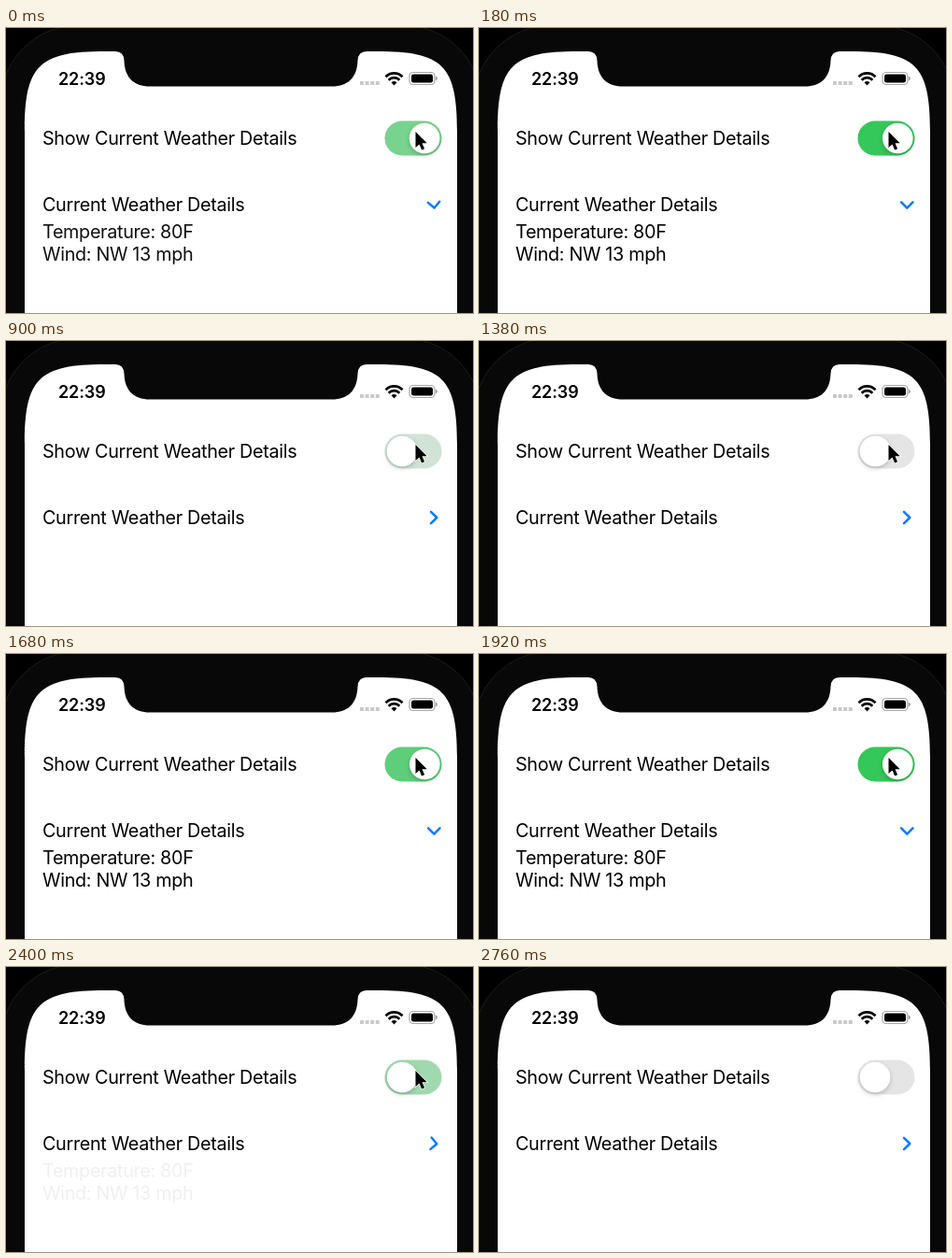
An HTML page for the animation above (3480 ms loop, 500 px wide and 305 px high).

```html
<!DOCTYPE html>
<html lang="en">
<head>
<meta charset="utf-8">
<title>Weather details toggle</title>
<style>
  html, body { margin: 0; height: 100%; overflow: hidden; background: #000; }
  svg { display: block; width: 500px; height: 305px; }
  text { font: 19.8px Inter, "Liberation Sans", sans-serif; letter-spacing: -0.0165em; }
  .clock { font-size: 18px; font-weight: 600; letter-spacing: -0.006em; }
  #knob { filter: drop-shadow(0 2px 2.5px rgba(0, 0, 0, .2)); }
</style>
</head>
<body>
<svg viewBox="0 0 500 305">
  <rect width="500" height="305"/>
  <rect x="-6" y="-3" width="515" height="400" rx="84" fill="#080808" stroke="#1c1c1c"/>
  <path fill="#fff" d="M20 305V111C20 40 35 25 106 25H117Q126 25 126.500 35C127 53 137 62.500 154 62.500H349C366 62.500 376 53 376.500 35Q377 25 386 25H397C468 25 483 40 483 111V305Z"/>

  <text class="clock" x="56" y="60.500">22:39</text>
  <path d="M379 59h22" stroke="#c9c9cb" stroke-width="4" stroke-dasharray="4 1.600"/>
  <path d="M406.500 52.200a12.500 12.500 0 0 1 18 0M409.700 55.700a8 8 0 0 1 11.600 0" fill="none" stroke="#000" stroke-width="2.700"/>
  <path d="M415.500 61.500l-3-3.200a4.400 4.400 0 0 1 6 0z"/>
  <rect x="432" y="47.500" width="27" height="13" rx="4" fill="none" stroke="#a4a4a4" stroke-width="1.200"/>
  <rect x="434" y="49.500" width="23" height="9" rx="2.300"/>
  <path d="M460.500 52q2 2 0 4z" fill="#a4a4a4" stroke="#a4a4a4"/>

  <text x="39" y="125.300">Show Current Weather Details</text>
  <rect x="405.500" y="99.500" width="61" height="37" rx="18.500" fill="#e5e5e6"/>
  <rect id="green" x="405.500" y="99.500" width="61" height="37" rx="18.500" fill="#34c759"/>
  <rect id="knob" y="101.700" height="32.600" rx="16.300" fill="#fff"/>

  <text x="39" y="196.300">Current Weather Details</text>
  <path id="chevron" d="M455 182.800L461.300 189L455 195.200" fill="none" stroke="#0a7aff" stroke-width="2.500" stroke-linecap="round" stroke-linejoin="round"/>
  <g id="details">
    <text x="39" y="225.300">Temperature: 80F</text>
    <text x="39" y="249.300">Wind: NW 13 mph</text>
  </g>

  <path id="cursor" d="M0 0V17L4 13.400L6.600 19.600L9.600 18.300L7 12.200H12.200Z" stroke="#fff" stroke-width="1.500" paint-order="stroke"/>
</svg>
<script>
  const LOOP = 3480;
  const KNOB = 32.6;
  // Taps alternate on, off; the first one happens before the loop begins
  const taps = [-300, 540, 1350, 2100];
  const [green, knob, chevron, details, cursor] =
    ["green", "knob", "chevron", "details", "cursor"].map(id => document.getElementById(id));

  // Smooth rise from 0 to 1 between two times
  function ramp(t, from, to) {
    const u = Math.min(1, Math.max(0, (t - from) / (to - from)));
    return u * u * (3 - 2 * u);
  }

  function draw(now) {
    const t = now % LOOP;
    const last = taps.filter(tap => tap <= t).length - 1;
    const sinceTap = t - taps[last];
    const toward = (from, to) => {
      const u = ramp(sinceTap, from, to);
      return last % 2 ? 1 - u : u;
    };

    const extra = 6 * (ramp(sinceTap, 0, 130) - ramp(sinceTap, 150, 310));
    const open = toward(190, 320);
    const leave = ramp(t, 2460, 2760);

    green.setAttribute("opacity", toward(140, 420));
    knob.setAttribute("x", 407.7 + (24.3 - extra) * toward(130, 310));
    knob.setAttribute("width", KNOB + extra);
    chevron.setAttribute("transform", `rotate(${90 * open} 458 189.300)`);
    details.setAttribute("opacity", open);
    cursor.setAttribute("transform", `translate(${438.5 + 66 * leave} ${111 - 31 * leave})`);
    cursor.setAttribute("visibility", leave < 1 ? "visible" : "hidden");
    requestAnimationFrame(() => draw(performance.now()));
  }
  draw(0);
</script>
</body>
</html>
```
